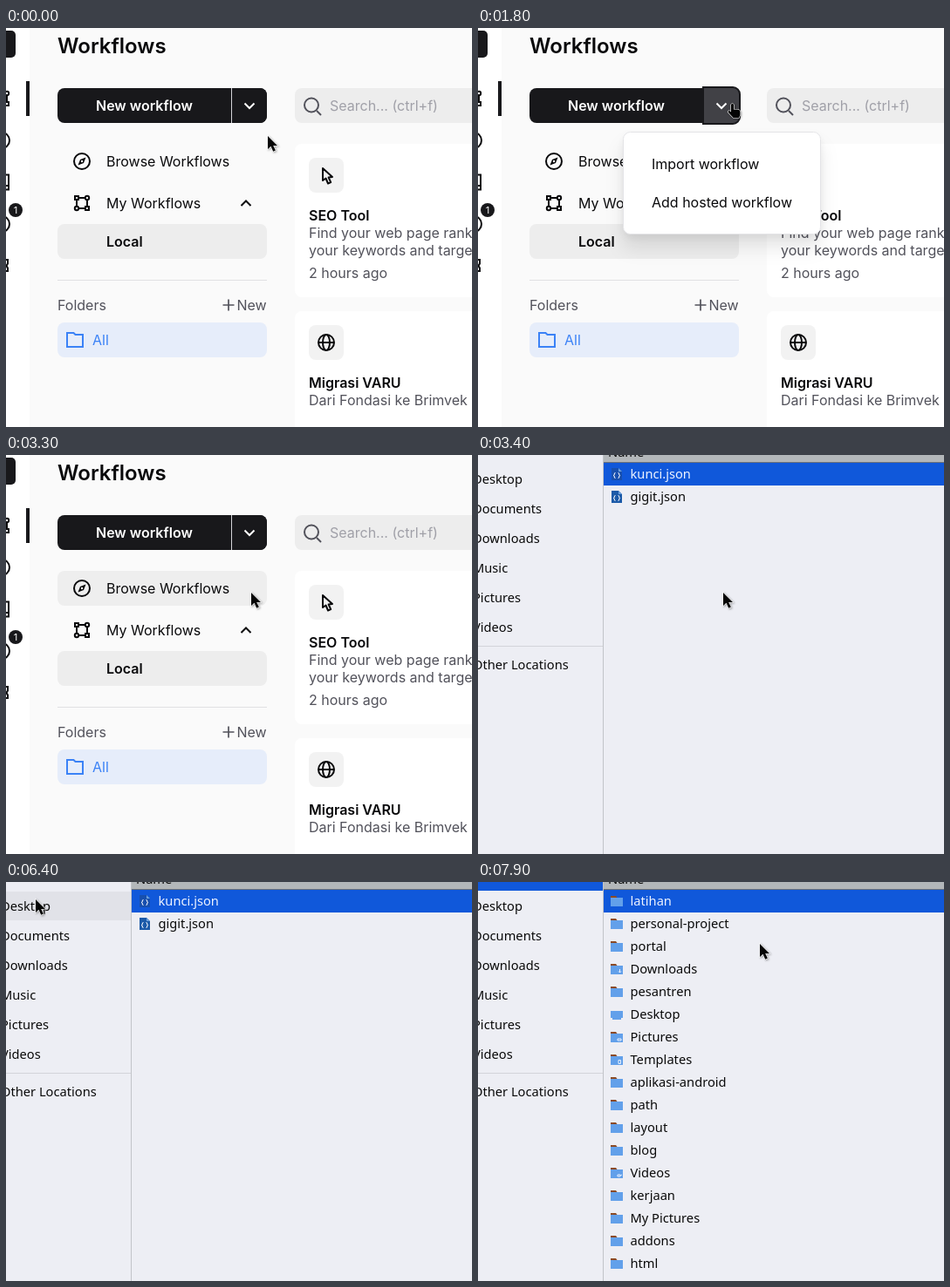
Animation, 534 px wide and 458 px high, one loop 8000 ms. Source, as an HTML page:

```html
<!DOCTYPE html>
<html lang="en">
<head>
<meta charset="utf-8">
<title>Import workflow</title>
<style>
html, body { margin: 0; width: 100%; height: 100%; overflow: hidden; background: #fafafa; }
svg { display: block; }
#page { font: 16px Inter, sans-serif; fill: #09090b; }
#files { font: 14.667px "Noto Sans", sans-serif; fill: #0a0a0a; }
.b { font-weight: 600; }
.g { fill: #52525b; }
.line { fill: none; stroke: #09090b; stroke-width: 2; }
.tile { fill: #f2f2f2; }
#popup rect:first-child {
  filter: drop-shadow(0 16px 10px rgba(0,0,0,.09)) drop-shadow(0 4px 4px rgba(0,0,0,.06));
}
.cursor {
  fill: #050505; stroke: #fff; stroke-width: 1.2; paint-order: stroke;
  filter: drop-shadow(1px 1px 1px rgba(0,0,0,.35));
}
</style>
</head>
<body>
<svg width="534" height="458" viewBox="0 0 534 458">
  <defs>
    <g id="flow" class="line">
      <path d="M4 4h4v4h-4zM16 16h4v4h-4zM8 6h7.500M6 8v7.500M18 8.500v7.500M8.500 18h7.500"/>
      <circle cx="18" cy="6" r="2.2"/><circle cx="6" cy="18" r="2.2"/>
    </g>
    <path id="folder" d="M0 2h14v9.500q0 .5-.5.5h-13q-.5 0-.5-.5z" fill="#62a0ea"/>
  </defs>

  <g id="page">
    <rect width="534" height="458" fill="#fafafa"/>
    <rect width="27" height="458" fill="#fff"/>
    <rect x="-21" y="3" width="32" height="31" rx="5" fill="#18181b"/>
    <rect x="23" y="61" width="4" height="40" fill="#18181b"/>
    <use href="#flow" x="-17" y="69"/>
    <g class="line">
      <circle cx="-5" cy="129" r="9"/>
      <path d="M-13 168.500h16v17h-16M-13 181h16"/>
      <circle cx="-5" cy="225" r="9"/>
      <path d="M-2 266h4v4.500q-2.500 2.500 0 5v3.500h-4"/>
    </g>
    <circle cx="11" cy="209" r="8" fill="#18181b"/>
    <text x="11" y="213" font-size="11" fill="#fff" text-anchor="middle">1</text>

    <text x="59" y="29" font-size="24" class="b">Workflows</text>
    <rect id="main" x="59" y="69" width="240" height="40" rx="8" fill="#18181b"/>
    <path d="M259 69h32a8 8 0 0 1 8 8v24a8 8 0 0 1-8 8h-32z" fill="#18181b"/>
    <path d="M258.500 69v40" stroke="#d4d4d8"/>
    <path id="caret" d="M258 68h34a8 8 0 0 1 8 8v26a8 8 0 0 1-8 8h-34z" fill="#414146" stroke="#18181b" stroke-width="2"/>
    <path d="M273.500 86.500l5.500 5.500l5.500-5.500" fill="none" stroke="#fff" stroke-width="2"/>
    <text x="103" y="95" class="b" fill="#fff">New workflow</text>

    <rect id="browse" x="59" y="133" width="240" height="40" rx="8" fill="#eee"/>
    <circle cx="87" cy="153" r="9" class="line"/>
    <path d="M91.500 148.500l-2.500 6.500l-6.500 2.500l2.500-6.500z"/>
    <circle cx="87" cy="153" r="1.2" fill="#fafafa"/>
    <text x="115" y="159">Browse Workflows</text>
    <use href="#flow" x="75" y="189"/>
    <text x="115" y="207">My Workflows</text>
    <path d="M269.500 204l5.500-5.500l5.500 5.500" class="line"/>
    <rect x="59" y="225" width="240" height="40" rx="8" fill="#ededed"/>
    <text x="115" y="251" class="b">Local</text>
    <path d="M59 289.500h240" stroke="#e0e0e3"/>
    <text x="59" y="324" class="g">Folders</text>
    <path d="M248.500 318h13M255 311.500v13" stroke="#52525b" stroke-width="1.700"/>
    <text x="264.500" y="324" class="g">New</text>
    <rect x="59" y="338" width="240" height="40" rx="8" fill="#e6edfa"/>
    <path d="M70 350h7.500l2 2h8.500v14h-18z" fill="none" stroke="#3b82f6" stroke-width="2"/>
    <text x="99" y="364" fill="#3b82f6">All</text>

    <rect x="331" y="69" width="240" height="40" rx="8" fill="#ededed"/>
    <path d="M356 95l5 5" stroke="#52525b" stroke-width="2"/>
    <circle cx="350" cy="88.500" r="8" fill="none" stroke="#52525b" stroke-width="2"/>
    <text x="371" y="95" fill="#a0a0a8">Search... (ctrl+f)</text>

    <rect x="331" y="133" width="240" height="176" rx="8" fill="#fff"/>
    <rect x="347" y="149" width="40" height="40" rx="8" class="tile"/>
    <path d="M363 161v14l3.500-2.500l2.500 6l3.200-1.400l-2.600-5.600l4.400-.6z" class="line" stroke-linejoin="round"/>
    <text x="347" y="221" class="b">SEO Tool</text>
    <text x="347" y="241" class="g">Find your web page ranking for</text>
    <text x="347" y="261" class="g">your keywords and target site</text>
    <text x="347" y="287" class="g">2 hours ago</text>

    <rect x="331" y="325" width="240" height="176" rx="8" fill="#fff"/>
    <rect x="347" y="341" width="40" height="40" rx="8" class="tile"/>
    <g class="line">
      <circle cx="367" cy="361" r="9"/><ellipse cx="367" cy="361" rx="4" ry="9"/><path d="M358 361h18"/>
    </g>
    <text x="347" y="413" class="b">Migrasi VARU</text>
    <text x="347" y="433" class="g">Dari Fondasi ke Brimvek</text>

    <g id="popup">
      <rect x="166.500" y="119.500" width="226" height="117" rx="8" fill="#fff" stroke="#e4e4e7"/>
      <rect id="import" x="183" y="136" width="194" height="40" rx="8" fill="#f2f2f2"/>
      <text x="199" y="162">Import workflow</text>
      <text x="199" y="206">Add hosted workflow</text>
    </g>
  </g>

  <g id="files">
    <rect width="534" height="458" fill="#edeef4"/>
    <rect id="desktop" y="11" width="143" height="33" fill="#e1e2e8"/>
    <rect id="home" y="-24" width="143" height="34" fill="#e1e2e8"/>
    <g id="places"></g>
    <path d="M0 219.500h143" stroke="#d3d4d9"/>
    <path d="M143.500 0v458" stroke="#c2c4c9"/>
    <rect x="144" width="390" height="9" fill="#b3b7ba"/>
    <path d="M144 8.500h390" stroke="#6b7178"/>
    <text x="149" y="2">Name</text>
    <rect x="144" y="9" width="390" height="26" fill="#1058da"/>
    <g id="recent"></g>
    <g id="folders"></g>
  </g>

  <path id="arrow" class="cursor" d="M0 0v15l3.500-3.200l2.700 6l2.700-1.200l-2.700-5.600h4.800z"/>
  <path id="hand" class="cursor" d="M-2 1q1.500-2.500 3 0v5.500h4.500q3 .5 3 3v3l-1.500 3.500h-6.500l-6-6.500q.5-2.200 2.500-1l1 .8z"/>
</svg>
<script>
const $ = id => document.getElementById(id);
const show = (id, on) => $(id).style.display = on ? '' : 'none';
const label = (x, y, s, fill = '#0a0a0a') => `<text x="${x}" y="${y}" fill="${fill}">${s}</text>`;
const rowText = (s, i) => label(174.5, 27 + 26 * i, s, i ? undefined : '#eef3ff');

const jsonIcon = i => `<g transform="translate(153 ${15 + 26 * i})">
  <path d="M0 0h8l4 4v10h-12z" fill="${i ? '#1c5aa8' : '#174fae'}"/><path d="M8 0v4h4z" fill="#6b9fdc"/>
  <path d="M4.500 5.500q-1.500 0-1.200 1.500q0 1.500-1 1.500q1 0 1 1.500q-.3 1.500 1.200 1.500M7.500 5.500q1.500 0 1.200 1.500q0 1.500 1 1.500q-1 0-1 1.500q.3 1.500-1.200 1.500"
    fill="none" stroke="#fff"/></g>`;

const emblems = {
  Downloads: 'M10.500 6v4M9 8.500l1.500 1.500l1.500-1.500',
  Pictures: 'M8 8h4v2h-4z',
  Templates: 'M9 6.500v4h2.500v-4z',
  Videos: 'M8 8h3v2h-3zM11 9l2-1'
};
const folderIcon = (s, i) => `<g transform="translate(152 ${16 + 26 * i})">
  ${s == 'Desktop' ? '' : '<path d="M0 3v-3h6l1.500 2h6.500v1z" fill="#8b4a24"/>'}
  <use href="#folder"/>
  ${s == 'Desktop' ? '<path d="M0 12v-2h2v2zM12 12v-2h2v2z" fill="#edeef4"/>' : ''}
  <path d="${emblems[s] || ''}" fill="none" stroke="#e8f1ff"/></g>`;

$('places').innerHTML = ['Desktop', 'Documents', 'Downloads', 'Music', 'Pictures', 'Videos']
  .map((s, i) => label(-6, 33 + 34 * i, s)).join('') + label(-6, 246, 'Other Locations');
$('recent').innerHTML = ['kunci.json', 'gigit.json'].map((s, i) => jsonIcon(i) + rowText(s, i)).join('');
$('folders').innerHTML = ('latihan,personal-project,portal,Downloads,pesantren,Desktop,Pictures,Templates,' +
  'aplikasi-android,path,layout,blog,Videos,kerjaan,My Pictures,addons,html')
  .split(',').map((s, i) => folderIcon(s, i) + rowText(s, i)).join('');

// Pointer path: time, x, y
const path = [
  [0, 300, 124], [100, 300, 124], [300, 292, 117], [500, 291, 140], [600, 291, 140], [900, 235, 92],
  [1300, 235, 92], [1600, 292, 87], [2100, 292, 87], [2300, 303, 125], [2500, 281, 158],
  [3800, 281, 158], [4400, 235, 24], [4700, 222, 37], [4800, 188, 91], [6300, 188, 91],
  [6400, 34, 20], [6700, 34, 20], [7000, 40, 4], [7600, 40, 4], [7900, 323, 71], [8000, 323, 71]
];

function pointer(t) {
  const i = path.findIndex(p => p[0] > t);
  const [t0, x0, y0] = path[i - 1], [t1, x1, y1] = path[i];
  const k = (t - t0) / (t1 - t0);
  return [x0 + (x1 - x0) * k, y0 + (y1 - y0) * k];
}

function draw(now) {
  const t = Math.floor(now % 8000 / 100) * 100;
  const [x, y] = pointer(t);
  const inside = (l, top, r, b) => x >= l && x < r && y >= top && y < b;
  const dialog = t >= 3400, open = t >= 1700 && t < 3300, home = t >= 7300;

  const onMain = !dialog && inside(59, 69, 258, 109);
  const onCaret = !dialog && inside(258, 69, 299, 109);
  const onBrowse = !dialog && !open && inside(59, 133, 299, 173);
  const onImport = open && inside(183, 136, 377, 176);

  show('page', !dialog);
  show('files', dialog);
  $('main').setAttribute('fill', onMain ? '#3f3f46' : '#18181b');
  show('caret', onCaret);
  show('browse', onBrowse);
  show('popup', open);
  $('popup').style.opacity = t < 1800 ? .5 : 1;
  show('import', onImport);

  show('desktop', inside(0, 11, 143, 45));
  show('home', home || inside(0, 0, 143, 11));
  $('home').setAttribute('fill', home ? '#1058da' : '#e1e2e8');
  show('recent', !home);
  show('folders', home);

  const hand = onMain || onCaret || onImport || onBrowse && t < 3300;
  show('hand', hand);
  show('arrow', !hand);
  $(hand ? 'hand' : 'arrow').setAttribute('transform', `translate(${x} ${y})`);
}

function loop() {
  draw(performance.now());
  requestAnimationFrame(loop);
}
loop();
</script>
</body>
</html>
```
